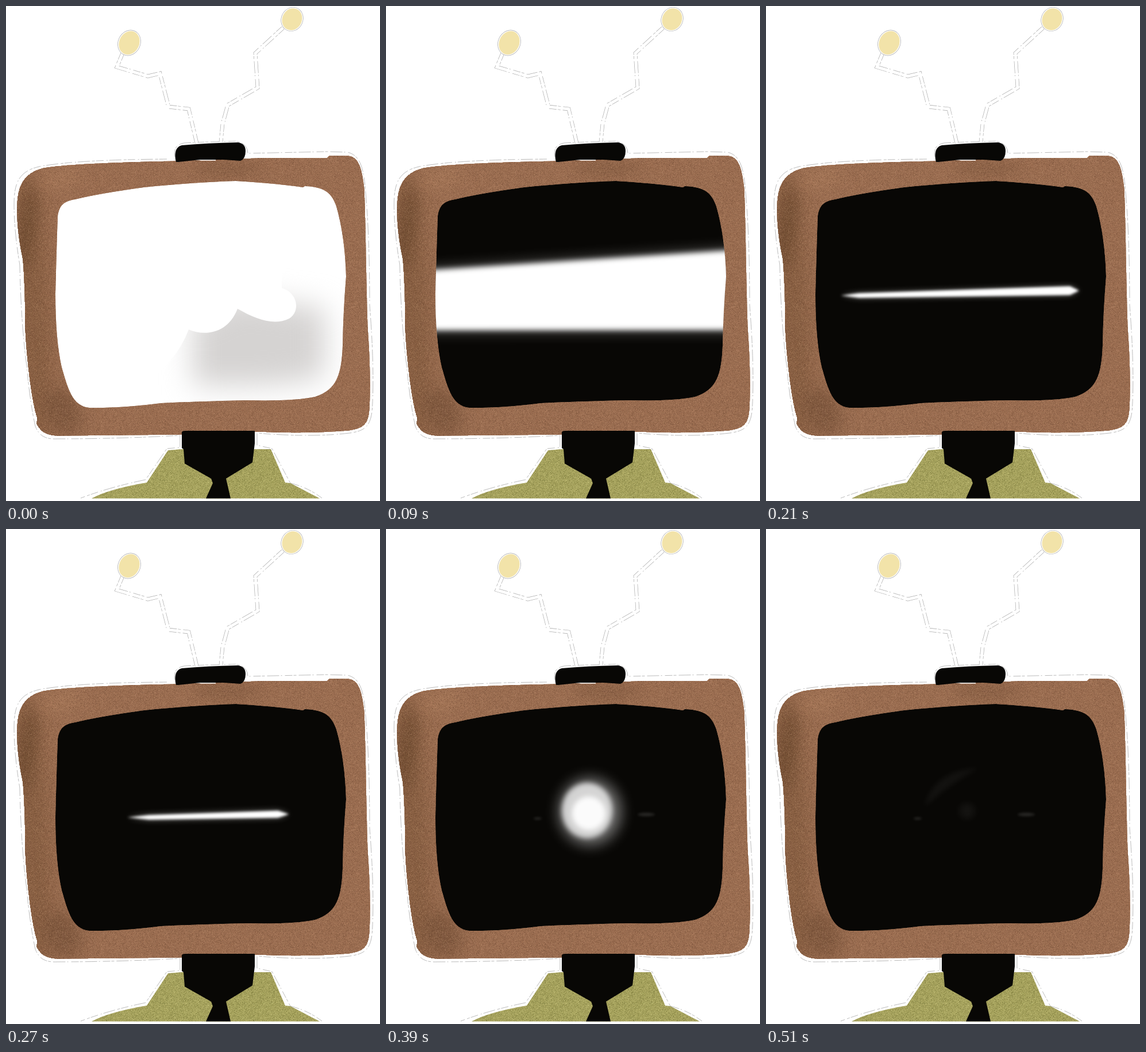
Recreate the animation shown at these times as an HTML page with a canvas. Size 651x860 px, loop 0.54 s.

```html
<!DOCTYPE html>
<html>
<head>
<meta charset="utf-8">
<style>
html, body { margin: 0; width: 100%; height: 100%; overflow: hidden; background: #fff; }
canvas { display: block; }
</style>
</head>
<body>
<canvas id="stage" width="651" height="860"></canvas>
<script>
const W = 651, H = 860, STEP = 30, LOOP = 540;
const BLACK = '#080705';
const ctx = document.getElementById('stage').getContext('2d');

const cabinet = new Path2D('M19 350C19 314 30 289 66 281C110 274 200 271 296 269L440 264L558 264L562 260L596 260C615 262 620 283 624 318C627 400 627 470 630 560Q636 640 633 700C631 728 622 734 596 738Q520 744 440 740L300 745L90 747C70 746 60 740 53 726L54 716C45 690 36 620 33 560Q33 490 29 440Q18 390 19 350Z');
const screen = new Path2D('M90 365C93 345 102 339 120 336Q160 326 240 315Q330 306 400 304Q470 308 517 315L520 313C555 314 567 325 575 348Q590 400 592 470Q587 530 586 590C584 640 576 667 538 679Q500 687 420 685Q330 687 270 690Q200 699 145 698C115 695 108 665 97 628Q86 580 86 500Q88 420 90 365Z');
const shirt = new Path2D('M149 855.5Q180 839 245 828L282 772L306 770H433L461 770L486 828L495 829L546 855.5Z');
const neck = new Path2D('M306 741Q306 738 312 738L433 738L433 760L429 793L383 821L391 855.5H348L360 829L357 821L311 795L309 770L306 768Z');
const cap = new Path2D('M296 271C293 258 294 245 306 242Q350 238 404 237Q417 239 417 252Q417 266 408 269L380 267H338L300 271Z');
const contour = new Path2D('M280 266Q120 267 58 279C22 287 14 308 14 345Q14 390 24 450Q26 550 36 625Q42 690 51 730C58 748 70 753 90 752Q200 752 303 746V767L280 769L243 823Q180 836 130 855M294 262Q290 242 310 238Q350 236 400 235Q420 238 421 256L558 253L594 254C618 259 623 285 626 325Q633 400 633 520Q641 620 638 690C637 730 626 738 598 742Q530 750 437 742V763L463 769L495 829Q525 836 550 855');
const aerials = new Path2D('M203 82L193 106L247 122L268 117L283 175L318 179L332 238M482 38L434 82L438 142L386 172L377 205L374 236');

function seeded(seed) {
  return () => (seed = (seed * 16807) % 2147483647) / 2147483647;
}

function grain(rgb, strength, seed) {
  const tile = new OffscreenCanvas(256, 256), t = tile.getContext('2d');
  const image = t.createImageData(256, 256), random = seeded(seed);
  for (let i = 0; i < image.data.length; i += 4) {
    image.data.set([...rgb, strength * random() ** 3], i);
  }
  t.putImageData(image, 0, 0);
  return tile;
}

function ellipse(c, x, y, rx, ry, color, blur = 0, turn = 0) {
  c.filter = blur ? `blur(${blur}px)` : 'none';
  c.fillStyle = color;
  c.beginPath();
  c.ellipse(x, y, rx, ry, turn, 0, 7);
  c.fill();
  c.filter = 'none';
}

function fill(c, path, color) {
  c.fillStyle = color;
  c.fill(path);
}

function drawSet() {
  const layer = new OffscreenCanvas(W, H), c = layer.getContext('2d');
  const light = c.createPattern(grain([232, 185, 150], 70, 7), 'repeat');
  const dark = c.createPattern(grain([55, 28, 14], 70, 91), 'repeat');
  c.fillStyle = '#fff';
  c.fillRect(0, 0, W, H);

  c.strokeStyle = '#aaa';
  c.lineWidth = 0.8;
  c.setLineDash([13, 2, 5, 4, 21, 3, 2, 5]);
  c.stroke(contour);
  c.lineWidth = 6.6;
  c.stroke(aerials);
  c.setLineDash([]);
  c.strokeStyle = '#fff';
  c.lineWidth = 5.2;
  c.stroke(aerials);

  for (const [x, y, rx, ry] of [[214.5, 64, 17.5, 21], [498, 23, 17, 19.5]]) {
    ellipse(c, x, y, rx + 2.2, ry + 2, '#aaa', 0, 0.45);
    ellipse(c, x, y, rx + 1.5, ry + 1.3, '#fff', 0, 0.45);
    ellipse(c, x, y, rx, ry, '#f2e3a9', 0, 0.45);
  }

  c.save();
  c.clip(cabinet);
  fill(c, cabinet, '#9c6e51');
  ellipse(c, 45, 520, 28, 260, '#6b4a2d70', 18, -0.06);
  ellipse(c, 36, 385, 12, 75, '#56381f90', 12, 0.15);
  ellipse(c, 100, 705, 30, 45, '#60402a70', 14, -0.4);
  ellipse(c, 385, 282, 60, 10, '#60402a60', 12);
  ellipse(c, 95, 300, 42, 16, '#b0805e90', 14, -0.3);
  fill(c, cabinet, light);
  fill(c, cabinet, dark);
  c.restore();

  fill(c, shirt, '#a8a45e');
  fill(c, shirt, c.createPattern(grain([225, 220, 150], 120, 33), 'repeat'));
  fill(c, shirt, c.createPattern(grain([70, 72, 20], 100, 57), 'repeat'));
  fill(c, neck, BLACK);
  fill(c, cap, BLACK);
  c.fillStyle = '#fff';
  c.fillRect(338, 267, 27, 1.5);
  return layer;
}

// Linear interpolation over rows of [time, ...values].
function sample(rows, t) {
  const n = rows.findIndex(row => row[0] >= t);
  if (n < 0 || t < rows[0][0]) return null;
  const b = rows[n], a = rows[Math.max(n - 1, 0)];
  const k = a === b ? 0 : (t - a[0]) / (b[0] - a[0]);
  return b.slice(1).map((v, i) => a[i + 1] + (v - a[i + 1]) * k);
}

// time, left, right, top and bottom at left, top and bottom at right, taper, blur
const beamKeys = [
  [30, 20, 660, 378, 645, 318, 668, 10, 6],
  [60, 20, 660, 421, 602, 372, 613, 10, 5],
  [120, 20, 660, 502, 524, 471, 512, 10, 5],
  [210, 130, 545, 499, 507, 487, 502, 16, 2],
  [330, 292, 440, 495, 503, 492, 501, 22, 2.5]
];
// time, x, y, rx, ry, halo alpha, core radius, core alpha, glow alpha, blur
const ballKeys = [
  [300, 356, 494, 30, 33, 0.4, 15, 0.5, 0.1, 6],
  [330, 355, 491, 57, 64, 0.62, 32, 0.93, 0.12, 5],
  [390, 350, 489, 44, 48, 0.7, 29, 0.9, 0.45, 4],
  [480, 350, 490, 18, 20, 0.15, 9, 0.15, 0.08, 6],
  [510, 350, 490, 14, 14, 0.05, 5, 0.02, 0, 6]
];

function drawCloudyScreen() {
  fill(ctx, screen, '#fff');
  ctx.filter = 'blur(25px)';
  fill(ctx, new Path2D('M325 545L400 505L555 525L555 638Q520 665 325 658Z'), '#d5d3d2');
  ctx.filter = 'none';
  fill(ctx, new Path2D('M240 655Q296 620 318 562C345 574 386 570 403 526C435 544 466 556 493 543C513 531 508 498 480 490V440H240Z'), '#fff');
}

function drawBeam([left, right, topL, botL, topR, botR, taper, blur]) {
  const midL = (topL + botL) / 2, midR = (topR + botR) / 2;
  const shape = new Path2D(`M${left} ${midL}L${left + taper * 2} ${topL}L${right - taper} ${topR}L${right} ${midR}L${right - taper} ${botR}L${left + taper * 2} ${botL}Z`);
  ctx.filter = `blur(${blur * 2.6}px)`;
  fill(ctx, shape, '#fff6');
  ctx.filter = `blur(${blur}px)`;
  fill(ctx, shape, '#fff');
  ctx.filter = 'none';
}

function drawBall([x, y, rx, ry, halo, core, shine, glow, blur]) {
  ellipse(ctx, x + 5, y + 2, rx + 10, ry + 10, `rgba(255,255,255,${glow})`, blur * 3);
  ellipse(ctx, x, y, rx, ry, `rgba(255,255,255,${halo})`, blur);
  ellipse(ctx, x + 3, y + 5, core, core, `rgba(255,255,255,${shine})`, blur);
}

const tvSet = drawSet();

function draw(t) {
  ctx.drawImage(tvSet, 0, 0);
  ctx.save();
  ctx.clip(screen);
  if (t < STEP) {
    drawCloudyScreen();
  } else {
    fill(ctx, screen, BLACK);
    if (t >= 300) {
      ellipse(ctx, 264, 503, 7, 2, '#fff2', 2);
      ellipse(ctx, 453, 496, 15, 3, '#fff2', 2);
    }
    if (t >= 480) {
      ctx.filter = 'blur(5px)';
      fill(ctx, new Path2D('M276 483Q290 420 370 415Q320 443 276 483Z'), '#ffffff0c');
      ctx.filter = 'none';
    }
    const ball = sample(ballKeys, t), beam = sample(beamKeys, t);
    if (ball) drawBall(ball);
    if (beam) drawBeam(beam);
  }
  ctx.restore();
}

function tick() {
  const t = performance.now() % LOOP;
  draw(Math.floor(t / STEP) * STEP);
  requestAnimationFrame(tick);
}
tick();
</script>
</body>
</html>
```
